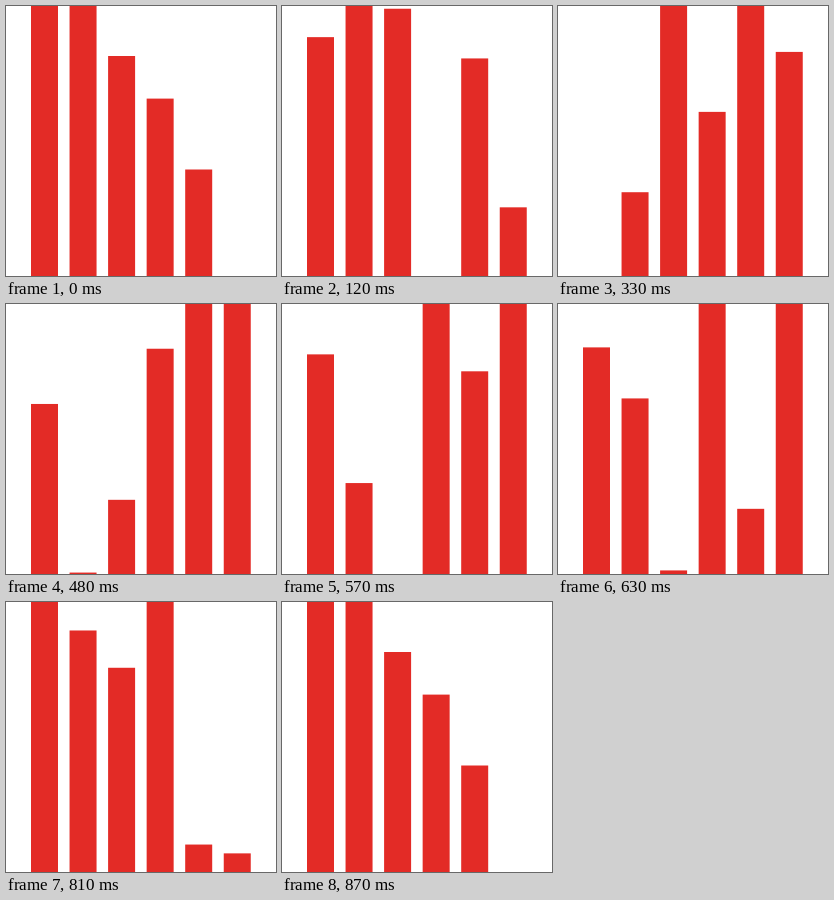
Write an HTML page that moves like this. It is 270 by 270 pixels and loops after 900 ms.

```html
<!DOCTYPE html>
<html lang="en">
<head>
<meta charset="utf-8">
<title>Bars</title>
<style>
  html, body { margin: 0; width: 100%; height: 100%; overflow: hidden; background: #fff; }
  svg { display: block; width: 100%; height: 100%; fill: #e32b26; }
</style>
</head>
<body>
<svg viewBox="0 0 270 270"></svg>
<script>
const STEP_MS = 30, STEPS = 30;
const TOPS = [277, 50, -91.8];        // each bar eases through these top edges
const DELAYS = [1, 2, 3, 0, 4, 5];    // in sixths of a cycle

const svg = document.querySelector('svg');
const bars = DELAYS.map((_, i) => {
  const bar = document.createElementNS('http://www.w3.org/2000/svg', 'rect');
  bar.setAttribute('x', 25 + i * 38.55);
  bar.setAttribute('width', 27);
  return svg.appendChild(bar);
});

// Closed form of cubic-bezier(.5, 0, .5, 1)
function ease(x) {
  const t = 0.5 + Math.sinh(Math.asinh(4 * x - 2) / 3);
  return t * t * (3 - 2 * t);
}

function topAt(cycle) {
  const pos = (cycle - Math.floor(cycle)) * 3;
  const i = Math.floor(pos) % 3;
  const from = TOPS[i], to = TOPS[(i + 1) % 3];
  return from + (to - from) * ease(pos - i);
}

function draw() {
  const step = Math.floor(performance.now() / STEP_MS) % STEPS;
  const progress = step / (STEPS - 1);  // the last step repeats the first pose
  bars.forEach((bar, i) => {
    const top = topAt(progress - (DELAYS[i] + 1) / 6);
    bar.setAttribute('y', top);
    bar.setAttribute('height', Math.max(0, 270 - top));
  });
  requestAnimationFrame(draw);
}
draw();
</script>
</body>
</html>
```
